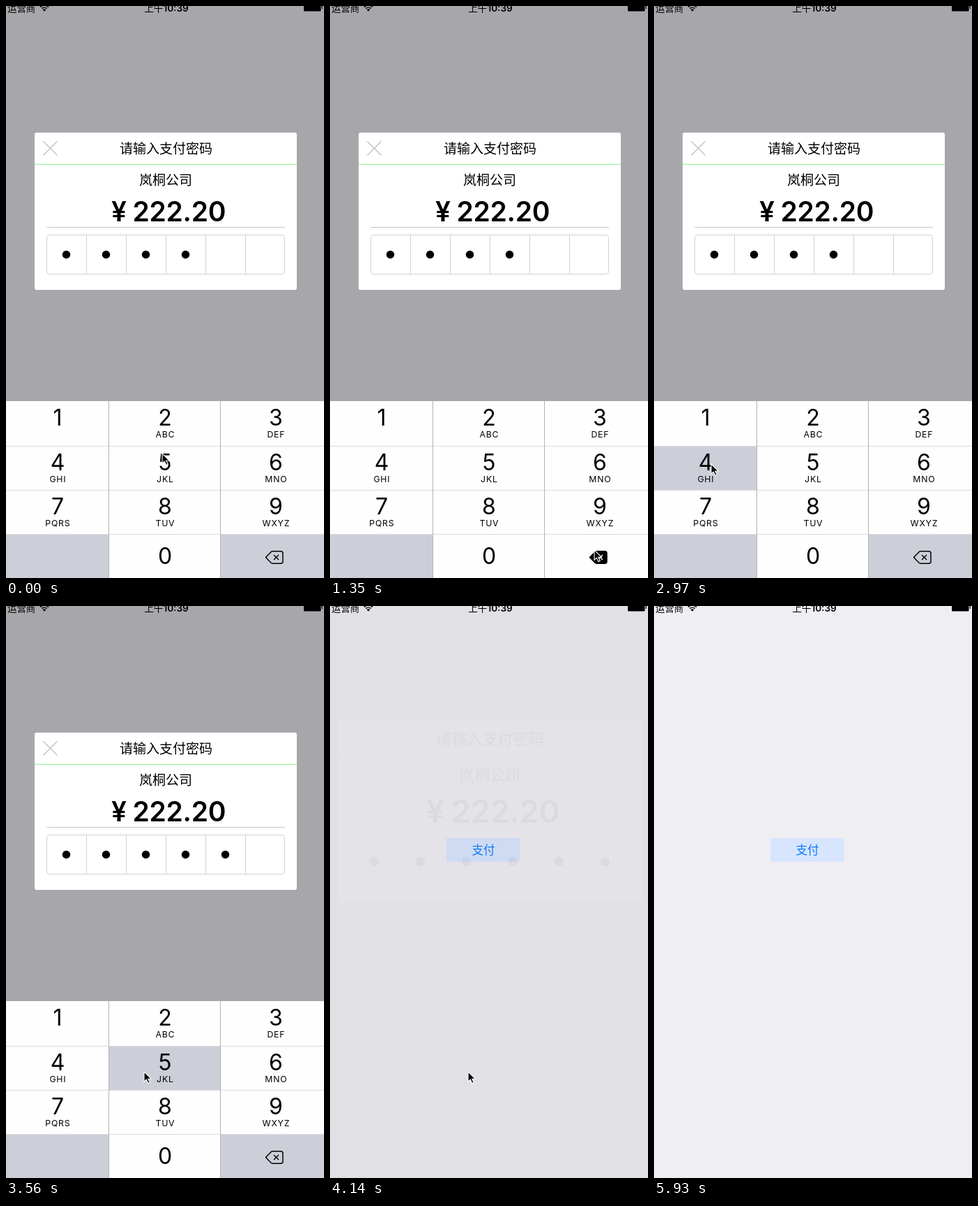
Recreate the animation shown at these times as an HTML page. Size 456x818 px, loop 6.61 s.

```html
<!DOCTYPE html>
<html lang="zh-CN">
<head>
<meta charset="utf-8">
<style>
  html, body { margin: 0; width: 100%; height: 100%; overflow: hidden; background: #efeef3; }
  svg { display: block; width: 456px; height: 818px; }
  text { font-family: Inter, "Noto Sans CJK SC", "Noto Sans CJK", sans-serif; }
  .mid { text-anchor: middle; }
  .title { font-size: 19px; }
  .amount { font-size: 39px; font-weight: 600; letter-spacing: -.3px; }
  .digit { font-size: 32px; }
  .letters { font-size: 12.3px; letter-spacing: .8px; }
  .thin { fill: none; stroke: #d2d2d2; }
</style>
</head>
<body>
<svg viewBox="0 0 456 818">
  <rect width="456" height="818" fill="#efeef3"/>
  <rect x="167" y="332" width="105.5" height="33.5" fill="#d7e5ff"/>
  <text class="mid" x="220" y="355" font-size="16.5" fill="#0a7aff">支付</text>

  <g id="modal">
    <rect width="456" height="818" opacity=".3"/>
    <g id="panel">
      <rect x="41" y="181" width="376" height="225" rx="3" fill="#fff"/>
      <path d="M53.5 193.5l20 20m0-20l-20 20" stroke="#8c8c8c" stroke-width=".9"/>
      <text class="mid title" x="229.5" y="211">请输入支付密码</text>
      <path id="rule" d="M41 226.5H417"/>
      <text class="mid title" x="229" y="256">岚桐公司</text>
      <text class="amount" x="151" y="308">¥</text>
      <text class="amount" x="181.5" y="308">222.20</text>
      <path class="thin" d="M58 316.5H400" style="stroke:#c6c6c6"/>
      <rect class="thin" x="58.5" y="327.5" width="341" height="56" rx="4"/>
      <path class="thin" d="M115.5 328v55m57-55v55m57-55v55m57-55v55m57-55v55"/>
      <g id="dots"></g>
    </g>
  </g>

  <g id="keyboard"></g>

  <text x="2" y="8" font-size="13.4">运营商</text>
  <path d="M49 1.5a8.5 8.5 0 0 1 12 0M51.3 3.7a5.4 5.4 0 0 1 7.4 0" fill="none" stroke="#000" stroke-width="1.7"/>
  <path d="M55 7.7l-2.3-2.4a3.3 3.3 0 0 1 4.6 0z"/>
  <text class="mid" x="230" y="8" font-size="13.6" font-weight="600"><tspan font-weight="500">上午</tspan>10:39</text>
  <path d="M427 0H451.5V6.5q0 1-1 1H428q-1 0-1-1zM452.6 0h1.2v4h-1.2z"/>

  <path id="cursor" d="M0 0V14.2L3.3 11.2L5.8 16.6L8.2 15.6L5.8 10.3H10.4Z" stroke="#fff" stroke-width="1.1"/>
</svg>
<script>
const $ = id => document.getElementById(id);
const LOOP = 6610, TICKS = 40;
const GREY = '#cccfd8', WHITE = '#fefefe';

// Screen updates come every 150 ms, a few of them after 140 ms
const shortTicks = new Set([10, 14, 18, 20, 24, 26, 29]);
const starts = [0];
for (let k = 0; k < TICKS; k++) starts.push(starts[k] + (shortTicks.has(k) ? 140 : 150));

// Cursor: tick, x, y
const path = [
  [0, 224, 640], [2, 378, 652], [4, 378, 652], [7, 379, 778], [13, 379, 778],
  [15, 224, 597], [17, 224, 597], [19, 82, 655], [21, 82, 655],
  [23, 198, 666], [37, 198, 666], [39, 297, 790], [40, 330, 840]
];
// Number of dots from a tick on, and the key held down at a tick
const counts = [[0, 4], [4, 5], [9, 4], [11, 3], [17, 4], [21, 5], [25, 6]];
const DEL = 11;
const pressed = { 3: 5, 8: DEL, 9: DEL, 11: DEL, 16: 1, 20: 3, 24: 4 };

const colX = [0, 148, 308, 456], rowY = [565, 629, 692, 755, 818], midX = [74, 228, 387];
const letters = ['', 'ABC', 'DEF', 'GHI', 'JKL', 'MNO', 'PQRS', 'TUV', 'WXYZ'];

function buildKeyboard() {
  let cells = '', labels = '';
  for (let i = 0; i < 12; i++) {
    const c = i % 3, r = Math.floor(i / 3), x = midX[c], y = rowY[r];
    cells += `<rect class="key" x="${colX[c]}" y="${y}" width="${colX[c + 1] - colX[c]}" height="${rowY[r + 1] - y}"/>`;
    if (i < 9 || i === 10) {
      const base = i === 10 ? 798 : [600, 664, 727][r];
      labels += `<text class="mid digit" x="${x}" y="${base}">${i === 10 ? 0 : i + 1}</text>`;
      if (letters[i]) labels += `<text class="mid letters" x="${x + .4}" y="${base + 17.3}">${letters[i]}</text>`;
    }
  }
  $('keyboard').innerHTML = cells +
    `<path d="M0 629.5H456M0 692.5H456M0 755.5H456" stroke="#dcdce0"/>
     <path d="M147.5 565V818M307.5 565V818" stroke="#b2b2b6"/>` + labels +
    `<path id="delBody" d="M372.5 788.5L379.8 781Q381 779.8 382.6 779.8H394Q397 779.8 397 782.8V794.2Q397 797.2 394 797.2H382.6Q381 797.2 379.8 796Z" stroke="#000" stroke-width="1.5" stroke-linejoin="round"/>
     <path id="delCross" d="M384 785l7 7m0-7l-7 7" stroke-width="1.4"/>`;
}

buildKeyboard();
for (let i = 0; i < 6; i++)
  $('dots').innerHTML += `<circle cx="${86.5 + 57 * i}" cy="355.5" r="5.7"/>`;
const keys = [...document.querySelectorAll('.key')];
const dots = [...$('dots').children];

const smooth = p => { p = Math.min(1, Math.max(0, p)); return p * p * (3 - 2 * p); };

function spring(ms) {
  const w = Math.max(0, ms) * .01826;
  return 1 - (1 + w) * Math.exp(-w);
}

function cursorAt(k) {
  const i = Math.max(1, path.findIndex(p => p[0] >= k));
  const [k0, x0, y0] = path[i - 1], [k1, x1, y1] = path[i];
  const p = smooth((k - k0) / (k1 - k0));
  return [x0 + (x1 - x0) * p, y0 + (y1 - y0) * p];
}

function draw(ms) {
  const k = starts.findLastIndex(s => s <= ms), t = starts[k];

  const count = counts.findLast(c => c[0] <= k)[1];
  dots.forEach((d, i) => d.setAttribute('visibility', i < count ? 'visible' : 'hidden'));

  const held = pressed[k];
  keys.forEach((key, i) => key.setAttribute('fill', (i === 9 || i === DEL) !== (i === held) ? GREY : WHITE));
  $('delBody').setAttribute('fill', held === DEL ? '#000' : 'none');
  $('delCross').setAttribute('stroke', held === DEL ? '#fff' : '#000');

  // The keyboard slides out, then the dialog grows and fades
  const drop = t >= 4140 ? 260 : 253 * spring(t - 3630);
  $('keyboard').setAttribute('transform', `translate(0 ${drop})`);
  const a = 1 - smooth((t - 3948) / 266);
  $('modal').setAttribute('opacity', a);
  $('panel').setAttribute('opacity', a);
  $('panel').setAttribute('transform', `translate(229 293.5) scale(${1.2 - .2 * a}) translate(-229 -293.5)`);
  $('rule').setAttribute('stroke', a < 1 ? '#c4c4c6' : '#8df58a');

  $('cursor').setAttribute('transform', `translate(${cursorAt(k)})`);
}

function tick() {
  draw(performance.now() % LOOP);
  requestAnimationFrame(tick);
}
tick();
</script>
</body>
</html>
```
